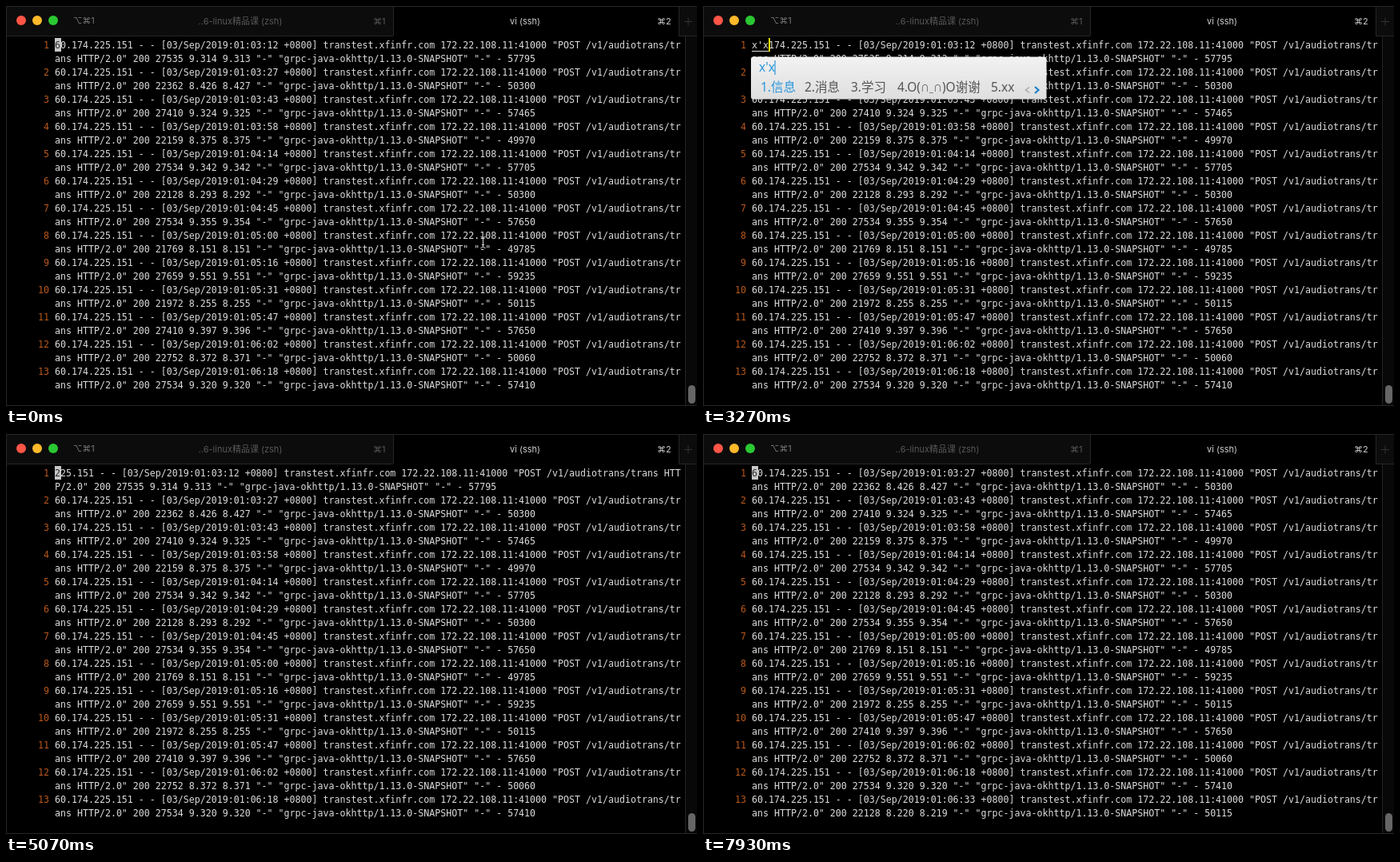
Animation of 864 by 500 pixels, one loop 8000 ms. Source, as an HTML page:

```html
<!DOCTYPE html>
<html lang="zh-CN">
<head>
<meta charset="utf-8">
<title>Terminal</title>
<style>
  html, body { margin: 0; width: 100%; height: 100%; overflow: hidden; background: #000; }
  svg { display: block; width: 864px; height: 500px; }
  text { white-space: pre; }
  .mono { font: 11.627px "DejaVu Sans Mono", monospace; fill: #dcdcdc; }
  .num { fill: #b8581c; text-anchor: end; }
  .tab { font: 11px Inter, "Noto Sans CJK SC", "DejaVu Sans", sans-serif; fill: #585858; }
  .on { fill: #cfcfcf; }
  .ime { font: 15.5px "Noto Sans", "Noto Sans CJK SC", "DejaVu Sans", sans-serif; fill: #555; }
  .ime .pick { fill: #2a97dc; }
  .small { font-size: 11px; }
</style>
</head>
<body>
<svg viewBox="0 0 864 500">
  <defs>
    <linearGradient id="paper" x2="0" y2="1">
      <stop offset="0" stop-color="#f2f2f2"/>
      <stop offset="1" stop-color="#dedede"/>
    </linearGradient>
  </defs>
  <rect width="864" height="500"/>

  <g id="titlebar">
    <path d="M0 0H484V37H0zM841 0H864V37H841z" fill="#0c0c0c"/>
    <path d="M0 .5H864M0 37.5H484M841 37.5H864M484.5 0V37M841.5 0V37M.5 0V500M849.5 38V500M0 499.5H864" stroke="#262626" fill="none"/>
    <circle cx="19" cy="18" r="6" fill="#ff5546"/>
    <circle cx="39" cy="18" r="6" fill="#ffb92a"/>
    <circle cx="59" cy="18" r="6" fill="#2ac832"/>
    <g class="tab">
      <text x="84" y="22" fill="#777">⌥⌘1</text>
      <text x="293" y="23" text-anchor="middle">..6-linux精品课 (zsh)</text>
      <text x="459" y="23">⌘1</text>
      <text class="on" x="649" y="23" text-anchor="middle">vi (ssh)</text>
      <text class="on" x="814" y="23">⌘2</text>
      <path d="M848 19.5H858M853 14.5V24.5" stroke="#333"/>
    </g>
    <rect x="850" y="38" width="14" height="461" fill="#080808"/>
    <rect x="853" y="474" width="9" height="23" rx="4.5" fill="#666"/>
  </g>

  <g id="rows" class="mono"></g>

  <g id="block">
    <rect x="61" y="40" width="8" height="17" fill="#c8c8c8"/>
    <text id="under" class="mono" x="61" y="53" style="fill:#2c2c2c"></text>
  </g>

  <path id="mouse" d="M593.5 288.5Q596.5 288.5 596.5 291V300Q596.5 302.5 593.5 302.5M599.5 288.5Q596.5 288.5 596.5 291M596.5 300Q596.5 302.5 599.5 302.5M595 298.5H598" fill="none" stroke="#d8d8d8"/>

  <g id="ime">
    <rect x="61" y="40" width="21" height="17"/>
    <text class="mono" x="61" y="53">x'x</text>
    <path d="M61 56.5H82" stroke="#dcdcdc"/>
    <path d="M83 40V57" stroke="#e8e400" stroke-width="2"/>
    <rect x="60" y="63.5" width="369.5" height="53" rx="3" fill="url(#paper)"/>
    <g class="ime">
      <text class="pick" x="70" y="82">x'x</text>
      <path d="M90 68V86" stroke="#2a97dc" stroke-width="1.2"/>
      <text class="pick" x="72" y="107">1.信息</text>
      <text x="127" y="107">2.消息</text>
      <text x="185" y="107">3.学习</text>
      <text x="243" y="107">4.O(<tspan class="small">∩_∩</tspan>)O谢谢</text>
      <text x="360" y="107">5.xx</text>
      <path d="M408 101.5L403.5 105L408 108.5" fill="none" stroke="#aaa" stroke-width="1.5"/>
      <path d="M415 101L419.5 105L415 109" fill="none" stroke="#1c80c8" stroke-width="2.2"/>
    </g>
  </g>
</svg>
<script>
const LOOP = 8000, COLUMNS = 112, VISIBLE = 13;
const IME_OPEN = 2350, IME_CLOSE = 3600, LINE_DELETE = 7300;
const FIRST_DELETE = 3700, DELETE_INTERVAL = 200, MAX_DELETES = 10;

// bytes, request time, upstream time, final counter
const requests = `27535 9.314 9.313 57795
22362 8.426 8.427 50300
27410 9.324 9.325 57465
22159 8.375 8.375 49970
27534 9.342 9.342 57705
22128 8.293 8.292 50300
27534 9.355 9.354 57650
21769 8.151 8.151 49785
27659 9.551 9.551 59235
21972 8.255 8.255 50115
27410 9.397 9.396 57650
22752 8.372 8.371 50060
27534 9.320 9.320 57410
22128 8.220 8.219 50115`.split("\n");

const $ = id => document.getElementById(id);
const pad = n => String(n).padStart(2, "0");
const clamp = (value, low, high) => Math.min(high, Math.max(low, value));

const log = requests.map((request, i) => {
  const [bytes, total, upstream, count] = request.split(" ");
  const seconds = 192 + Math.floor(15.5 * i);
  const clock = `01:${pad(Math.floor(seconds / 60))}:${pad(seconds % 60)}`;
  return `60.174.225.151 - - [03/Sep/2019:${clock} +0800] transtest.xfinfr.com ` +
    `172.22.108.11:41000 "POST /v1/audiotrans/trans HTTP/2.0" 200 ${bytes} ${total} ${upstream} ` +
    `"-" "grpc-java-okhttp/1.13.0-SNAPSHOT" "-" - ${count}`;
});

function addText(x, y, content = "", className = "") {
  const node = document.createElementNS("http://www.w3.org/2000/svg", "text");
  node.setAttribute("x", x);
  node.setAttribute("y", y);
  node.setAttribute("class", className);
  node.textContent = content;
  $("rows").append(node);
  return node;
}

const lines = Array.from({ length: VISIBLE }, (_, i) => {
  const y = 53 + 34 * i;
  addText(54, y, i + 1, "num");
  return [addText(61, y), addText(61, y + 17)];
});

function showLog(first, removed) {
  lines.forEach(([top, bottom], i) => {
    const line = log[first + i].slice(i ? 0 : removed);
    // The block cursor draws the first character itself.
    top.textContent = i ? line.slice(0, COLUMNS) : " " + line.slice(1, COLUMNS);
    bottom.textContent = line.slice(COLUMNS);
    if (!i) $("under").textContent = line[0];
  });
}

const show = (id, visible) => $(id).style.display = visible ? "" : "none";
let lastState;

function draw(now) {
  const t = now % LOOP;
  const first = t >= LINE_DELETE ? 1 : 0;
  const presses = Math.floor((t - FIRST_DELETE) / DELETE_INTERVAL) + 1;
  const removed = first ? 0 : clamp(presses, 0, MAX_DELETES);
  const composing = t >= IME_OPEN && t < IME_CLOSE;
  const state = [first, removed, composing, t < IME_OPEN].join();
  if (state !== lastState) {
    lastState = state;
    showLog(first, removed);
    show("ime", composing);
    show("block", !composing);
    show("mouse", t < IME_OPEN);
  }
}

const start = performance.now();
function tick() {
  draw(performance.now() - start);
  requestAnimationFrame(tick);
}
tick();
</script>
</body>
</html>
```
